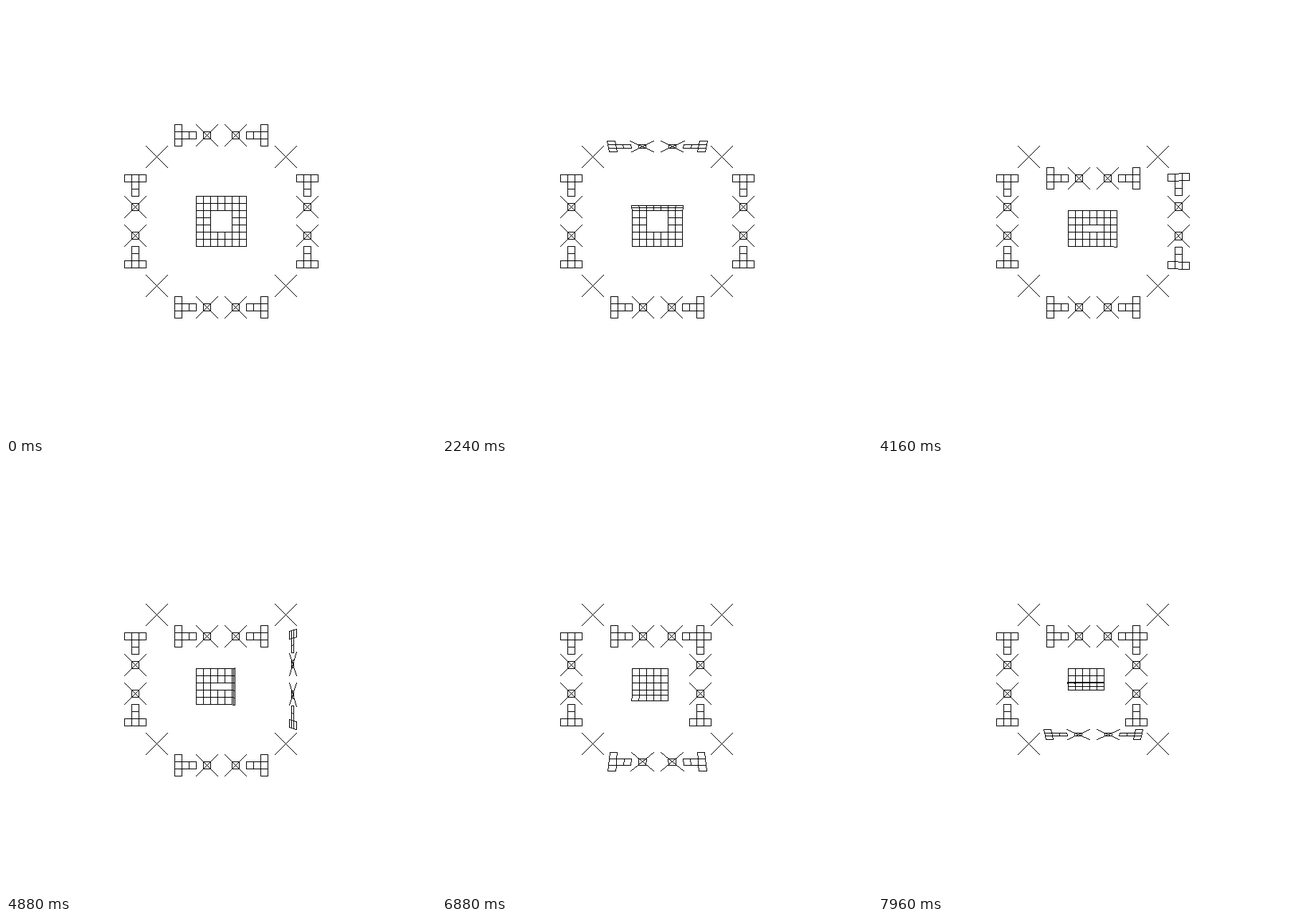
An HTML page with a canvas for the animation above (8 s loop, 600 by 600 pixels).

```html
<!DOCTYPE html>
<html lang="en">
<head>
<meta charset="utf-8">
<title>Folding pattern</title>
<style>
  html, body { margin: 0; height: 100%; overflow: hidden; background: #fff; }
  canvas { display: block; }
</style>
</head>
<body>
<canvas id="stage" width="600" height="600"></canvas>
<script>
const ctx = document.getElementById("stage").getContext("2d");
const LOOP = 8000, TICK = 40, FIRST_FOLD = 1250, FOLD_TIME = 2500;
const CENTER = 300, CAMERA = 600, CELL = 10;

// Hard-edged line between whole pixels, without antialiasing.
function line([x0, y0], [x1, y1]) {
  const steps = Math.max(Math.abs(x1 - x0), Math.abs(y1 - y0), 1);
  for (let i = 0; i <= steps; i++) {
    const x = Math.round(x0 + (x1 - x0) * i / steps);
    const y = Math.round(y0 + (y1 - y0) * i / steps);
    ctx.fillRect(x, y, 1, 1);
  }
}

const toPixel = (x, y) => [Math.round(CENTER + x), Math.round(CENTER + y)];

// Maps (along, outward) on one side of the sheet to the screen,
// turned about the hinge by angle. Sides: top, right, bottom, left.
function sideMap(side, hinge, angle) {
  return (along, outward) => {
    const reach = outward - hinge;
    const zoom = CAMERA / (CAMERA - reach * Math.sin(angle));
    const a = along * zoom;
    const b = (hinge + reach * Math.cos(angle)) * zoom;
    return toPixel(...[[a, -b], [b, a], [-a, b], [-b, -a]][side]);
  };
}

function cell(map, a, b) {
  const p = [map(a, b), map(a + CELL, b), map(a + CELL, b + CELL), map(a, b + CELL)];
  p.forEach((point, i) => line(point, p[(i + 1) % 4]));
}

function grid(map, a0, a1, b0, b1) {
  for (let a = a0; a < a1; a += CELL)
    for (let b = b0; b < b1; b += CELL) cell(map, a, b);
}

function cross(map, a, b) {
  line(map(a - 15, b - 15), map(a + 15, b + 15));
  line(map(a - 15, b + 15), map(a + 15, b - 15));
}

function strip(map) {
  for (const sign of [-1, 1]) {
    grid(map, sign * 60 - 5, sign * 60 + 5, 105, 135);
    grid(map, sign * 45 - 10, sign * 45 + 10, 115, 125);
    cross(map, sign * 20, 120);
    cell(map, sign * 20 - 5, 115);
  }
}

function draw(time) {
  ctx.fillStyle = "#fff";
  ctx.fillRect(0, 0, 600, 600);
  ctx.fillStyle = "#000";

  for (const x of [-90, 90])
    for (const y of [-90, 90]) cross(toPixel, x, y);

  const progress = (time - FIRST_FOLD) / FOLD_TIME;
  for (let side = 0; side < 4; side++) {
    const angle = side < 3 ? Math.PI * Math.min(1, Math.max(0, progress - side)) : 0;
    strip(sideMap(side, 90, angle));

    // Once the next side folds, it carries the overlapping corner away.
    const start = side === 0 ? -35 : -15;
    const end = side === 3 || progress > side + 1 ? 15 : 35;
    grid(sideMap(side, 15, angle), start, end, 15, 35);
  }
}

function frame() {
  const time = performance.now() % LOOP;
  draw(Math.floor(time / TICK) * TICK);
  requestAnimationFrame(frame);
}
frame();
</script>
</body>
</html>
```
